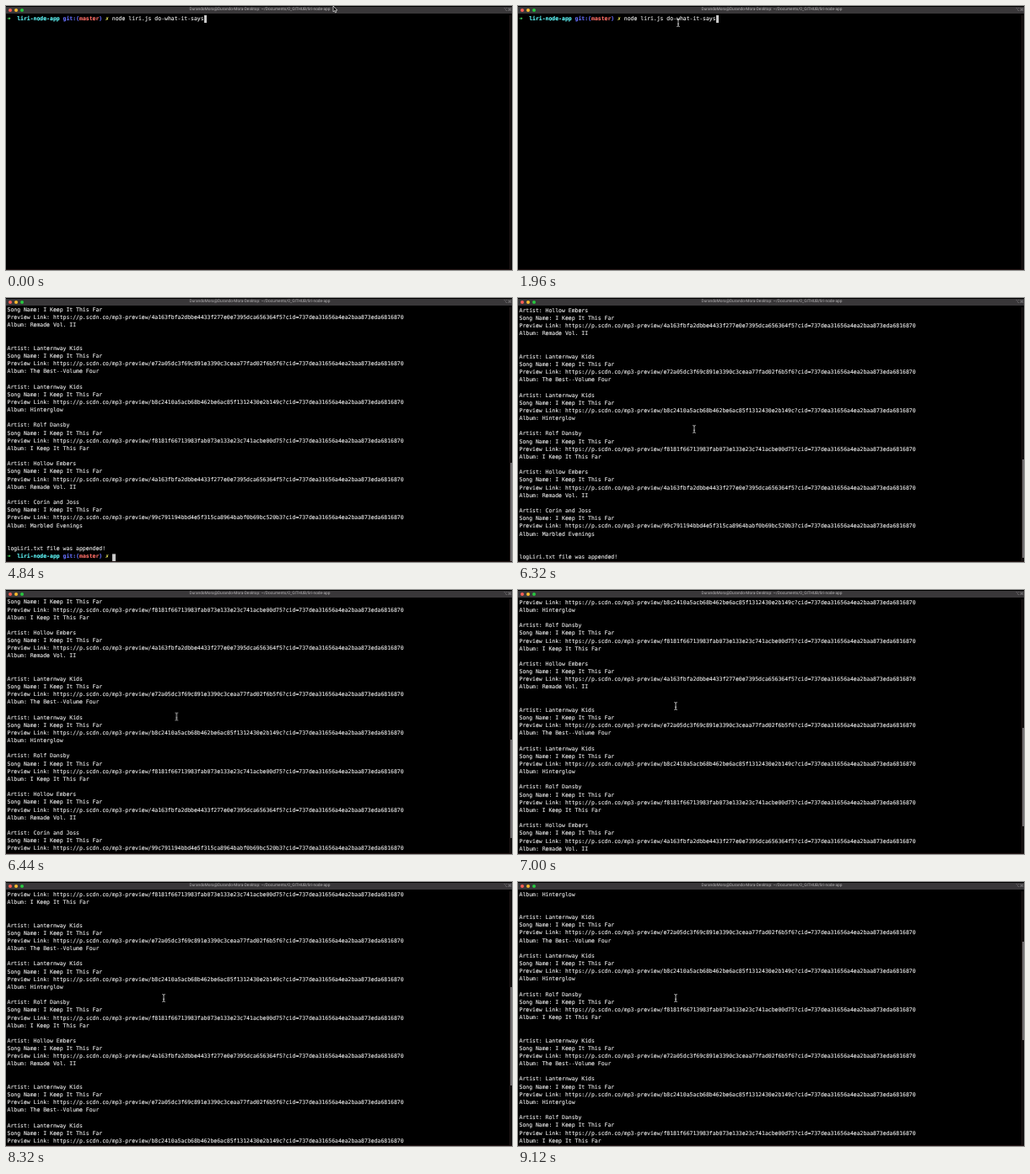
Write an HTML page that moves like this. It is 600x314 px and loops after 9920 ms.

```html
<!DOCTYPE html>
<html lang="en">
<head>
<meta charset="utf-8">
<title>Terminal</title>
<style>
@property --top { syntax: "<number>"; inherits: true; initial-value: 0; }
@property --row { syntax: "<number>"; inherits: true; initial-value: 0; }
@property --col { syntax: "<number>"; inherits: true; initial-value: 60; }

html, body { margin: 0; width: 100%; height: 100%; overflow: hidden; background: #000; }
body { --loop: 9920ms; --line: 9.165px; position: relative; text-rendering: geometricPrecision; }

.bar {
  position: absolute; inset: 1px 0 auto; height: 8px; overflow: hidden;
  background: #393739; color: #b4b2b4;
  font: 4.81px/8px Roboto, Inter, sans-serif; white-space: nowrap;
}
.light { position: absolute; top: 1.7px; width: 4.6px; height: 4.6px; border-radius: 50%; }
.title { position: absolute; inset: 0; text-align: center; left: 2px; }
.key { position: absolute; left: 590px; color: #8b898b; font-family: Inter, "DejaVu Sans", sans-serif; }

.frame {
  position: absolute; inset: 0; box-sizing: border-box;
  border-bottom: 1px solid #241616;
}
.term {
  position: absolute; inset: 11px 0 auto; height: 302.4px; overflow: hidden;
  animation: scroll var(--loop) step-end infinite;
}
.track { position: absolute; inset: 0 0 0 597px; background: #0d0b0b; border-left: 1px solid #211818; box-sizing: border-box; }
.thumb {
  position: absolute; left: 598px; width: 2px; height: 117.4px; background: #6e6c6e;
  top: calc(var(--top) * 302.4px / 85);
}
.sheet {
  position: absolute; left: 1.5px; top: 0; color: #f0f0f0;
  font: 6.463px/var(--line) "DejaVu Sans Mono", "DejaVu Sans", monospace; white-space: pre;
  -webkit-text-stroke: .1px;
  transform: translateY(calc(var(--top) * -1 * var(--line)));
}
.sheet div { height: var(--line); }
.sheet b i { display: inline-block; width: 1ch; font-style: normal; }
.sheet .caret {
  position: absolute; width: 1ch; height: var(--line); background: #c9c9c9;
  left: calc(var(--col) * 1ch); top: calc(var(--row) * var(--line));
  animation: caret var(--loop) step-end infinite;
}
.after { animation: show-after var(--loop) step-end infinite; }
.busy { animation: show-busy var(--loop) step-end infinite; }
.idle { animation: show-idle var(--loop) step-end infinite; }

.mouse {
  position: absolute; left: 0; top: 0; width: 1px; height: 1px; overflow: visible;
  animation: move var(--loop) linear infinite;
}
.arrow { animation: show-arrow var(--loop) step-end infinite; }
.beam { animation: show-beam var(--loop) step-end infinite; }

@keyframes scroll {
  0% { --top: 0; }
  48.79% { --top: 52; }
  63.7% { --top: 51; }
  64.11% { --top: 50; }
  64.51% { --top: 48; }
  64.91% { --top: 47; }
  65.32% { --top: 46; }
  66.12% { --top: 45; }
  66.93% { --top: 44; }
  67.74% { --top: 43; }
  75.4% { --top: 41; }
  75.8% { --top: 38; }
  76.2% { --top: 35; }
  83.46% { --top: 32; }
  84.27% { --top: 29; }
  85.08% { --top: 26; }
  91.12% { --top: 23; }
  91.53% { --top: 20; }
  91.93%, 100% { --top: 17; }
}
@keyframes caret {
  0% { --row: 0; --col: 60; }
  43.54% { --row: 1; --col: 0; }
  44.75% { --row: 2; --col: 0; }
  45.56% { --row: 3; --col: 0; }
  48.79%, 100% { --row: 84; --col: 32; }
}
@keyframes show-after { 0% { opacity: 0; } 48.79%, 100% { opacity: 1; } }
@keyframes show-busy { 0% { opacity: 0; } 43.54% { opacity: 1; } 48.79%, 100% { opacity: 0; } }
@keyframes show-idle { 0% { opacity: 1; } 43.54% { opacity: 0; } 48.79%, 100% { opacity: 1; } }
@keyframes show-arrow { 0% { opacity: 1; } 10.88%, 100% { opacity: 0; } }
@keyframes show-beam {
  0% { opacity: 0; }
  10.88% { opacity: 1; }
  43.54% { opacity: 0; }
  49.59%, 100% { opacity: 1; }
}
@keyframes move {
  0%, 9.67% { transform: translate(390px, 4px); }
  12% { transform: translate(352px, 22px); }
  14.5% { transform: translate(290px, 36px); }
  17% { transform: translate(225px, 38px); }
  19.75%, 19.9% { transform: translate(190px, 20px); }
  23% { transform: translate(178px, 19px); }
  27% { transform: translate(208px, 21px); }
  29.8% { transform: translate(238px, 20px); }
  31.04%, 49.59% { transform: translate(249.5px, 20.5px); animation-timing-function: ease-in-out; }
  58.4% { transform: translate(213px, 152px); }
  63.7% { transform: translate(209px, 156px); }
  67.74%, 100% { transform: translate(187px, 138px); }
}
</style>
</head>
<body>
<div class="frame"></div>
<div class="term">
  <div class="sheet"><div class="caret"></div></div>
  <div class="track"></div>
  <div class="thumb after"></div>
</div>
<div class="bar">
  <span class="light" style="left:2.7px;background:#ff5f57"></span>
  <span class="light" style="left:9.6px;background:#febc2e"></span>
  <span class="light" style="left:16.5px;background:#28c840"></span>
  <div class="title idle">DurandoMora@Durando-Mora-Desktop: ~/Documents/0_GITHUB/liri-node-app</div>
  <div class="title busy">node</div>
  <span class="key">⌥⌘1</span>
</div>
<svg class="mouse">
  <path class="arrow" d="M-2-4V2.8L-.5 1.5.6 4 1.7 3.5.7 1.1H2.8Z" fill="#000" stroke="#eee" stroke-width=".7"/>
  <path class="beam" d="M-1.7-4.5Q0-4.5 0-3.3Q0-4.5 1.7-4.5M0-3.5V3.5M-1.7 4.5Q0 4.5 0 3.3Q0 4.5 1.7 4.5M-1 1.3H1" fill="none" stroke="#e4e4e4" stroke-width=".8"/>
</svg>
<script>
const song = "I Keep It This Far";
const cid = "737dea31656a4ea2baa873eda6816870";
const tracks = [
  ["Lanternway Kids", "e72a05dc3f69c891e3390c3ceaa77fad02f6b5f6", "The Best--Volume Four"],
  ["Lanternway Kids", "b8c2410a5acb68b462be6ac85f1312430e2b149c", "Hinterglow"],
  ["Rolf Dansby", "f8181f66713983fab073e133e23c741acbe00d75", song],
  ["Hollow Embers", "4a163fbfa2dbbe4433f277e0e7395dca656364f5", "Remade Vol. II"],
  ["Corin and Joss", "99c791194bbd4e5f315ca8964babf0b69bc520b3", "Marbled Evenings"]
];

const paint = (color, text) => `<b style="color:${color}">${text}</b>`;
const prompt = paint("#4df06c", "<i>➜</i>") + "  " + paint("#60fdff", "liri-node-app") + " " +
  paint("#6871ff", "git:(") + paint("#ff6e67", "master") + paint("#6871ff", ")") + " " +
  paint("#fffc67", "<i>✗</i>") + " ";

const entry = ([artist, id, album]) => [
  `Artist: ${artist}`,
  `Song Name: ${song}`,
  `Preview Link: https://p.scdn.co/mp3-preview/${id}?cid=${cid}`,
  `Album: ${album}`,
  ""
];

// The log is printed again after each track is added to it.
const output = ["", ""];
tracks.forEach((_, i) => output.push(...tracks.slice(0, i + 1).flatMap(entry), ""));
output.push("logLiri.txt file was appended!", prompt);

const rows = lines => lines.map(line => `<div>${line}</div>`).join("");
document.querySelector(".sheet").insertAdjacentHTML("beforeend",
  rows([prompt + "node liri.js do-what-it-says"]) +
  `<section class="after">${rows(output)}</section>`);
</script>
</body>
</html>
```
